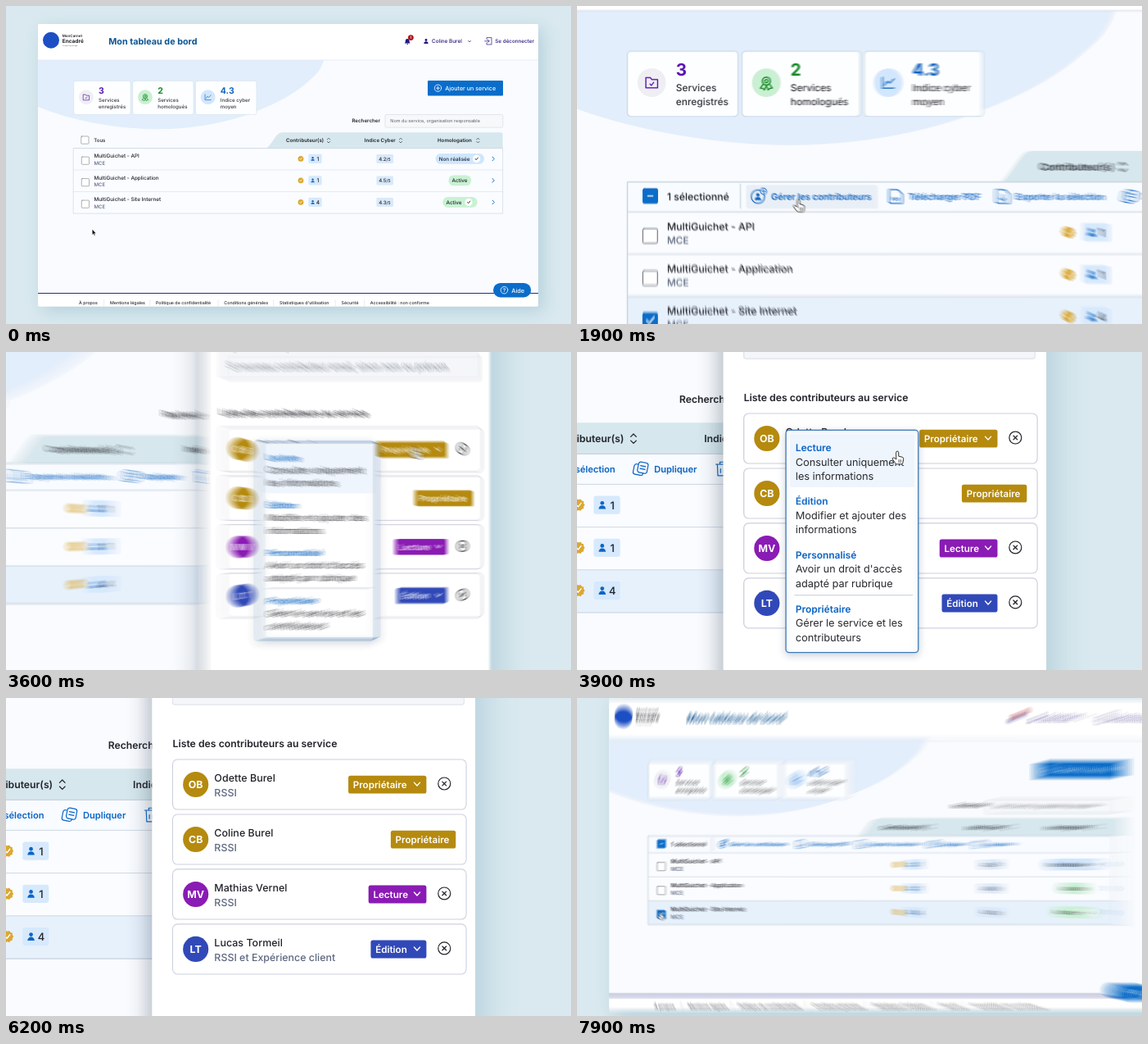
An HTML page with a canvas that plays this animation: 690 by 388 pixels, repeating every 8 s.

```html
<!DOCTYPE html>
<html lang="fr">
<head>
<meta charset="utf-8">
<title>Tableau de bord</title>
<style>
html, body { margin: 0; width: 100%; height: 100%; overflow: hidden; background: #d9e9ef; }
canvas { display: block; width: 690px; height: 388px; }
</style>
</head>
<body>
<canvas id="stage"></canvas>
<script>
const W = 690, H = 388, LOOP = 8000;
const BLUE = '#0b65c6', FILL = '#0a6dca', INK = '#22232b', NAVY = '#23187f', GREY = '#5d6880';
const GOLD = '#b58a0e', VIOLET = '#8a1bb4', INDIGO = '#3149b8', LINE = '#cfd8e2';
const dpr = window.devicePixelRatio || 1;
const stage = document.getElementById('stage');
const buffer = document.createElement('canvas');
for (const c of [stage, buffer]) { c.width = W * dpr; c.height = H * dpr; }
const out = stage.getContext('2d'), g = buffer.getContext('2d');

// Timing helpers
const clamp = v => Math.min(1, Math.max(0, v));
const ease = u => u < .5 ? 4 * u ** 3 : 1 - 4 * (1 - u) ** 3;
const ramp = (t, a, b) => ease(clamp((t - a) / (b - a)));
const track = (start, moves) => t => moves.reduce((v, [a, b, to]) => {
  const k = ramp(t, a, b);
  return v.map((p, i) => p + (to[i] - p) * k);
}, start);

const wide = [1, 0, 0];
const camera = track(wide, [
  [100, 600, [1.97, -101.8, -126]],
  [1830, 2200, wide],
  [3050, 3950, [1.97, -707.4, -217.6]],
  [6200, 6800, wide],
  [7723, 8323, [1.97, -36, -219]]
]);
const pointer = track([107, 276], [
  [80, 480, [100.1, 245.1]],
  [880, 1300, [191, 188.5]],
  [2250, 3250, [600, 166]],
  [3540, 3850, [558.4, 176]],
  [4550, 5200, [556, 242]],
  [5350, 5650, [550, 279]],
  [5680, 6030, [548, 318]],
  [6300, 6800, [642, 44]],
  [7120, 7650, [97, 262.4]]
]);
const panelShift = t => 215 * (1 - ramp(t, 1880, 2160) + ramp(t, 6850, 7080));
const menuOpen = t => t > 3500 && t < 6150;

// Drawing helpers
function text(s, x, y, size, color = INK, weight = 500, align = 'left') {
  g.font = `${weight} ${size}px Inter, "Open Sans", sans-serif`;
  g.textAlign = align;
  g.fillStyle = color;
  g.fillText(s, x, y + size * .35);
}
function paint(fill, stroke, width = .6) {
  if (fill) { g.fillStyle = fill; g.fill(); }
  if (stroke) { g.strokeStyle = stroke; g.lineWidth = width; g.stroke(); }
}
function box(x, y, w, h, r, fill, stroke, width) {
  g.beginPath();
  g.roundRect(x, y, w, h, r);
  paint(fill, stroke, width);
}
function disc(x, y, r, fill, stroke, width) {
  g.beginPath();
  g.arc(x, y, r, 0, 7);
  paint(fill, stroke, width);
}
function line(color, width, ...pts) {
  g.beginPath();
  for (let i = 0; i < pts.length; i += 2) g.lineTo(pts[i], pts[i + 1]);
  paint(null, color, width);
}
function path(d, x, y, fill, stroke, width) {
  g.save();
  g.translate(x, y);
  const p = new Path2D(d);
  if (fill) { g.fillStyle = fill; g.fill(p); }
  if (stroke) { g.strokeStyle = stroke; g.lineWidth = width; g.stroke(p); }
  g.restore();
}
function shadow(color, blur, dx, dy, scale) {
  const k = scale * dpr;
  g.shadowColor = color;
  g.shadowBlur = blur * k;
  g.shadowOffsetX = dx * k;
  g.shadowOffsetY = dy * k;
}
const noShadow = () => { g.shadowColor = 'transparent'; };
const tick = (x, y, k, color, w) => line(color, w, x - 1.6 * k, y, x - .4 * k, y + 1.3 * k, x + 1.8 * k, y - 1.4 * k);
const down = (x, y, color, k = 1) => line(color, .7, x - 1.8 * k, y - k, x, y + k, x + 1.8 * k, y - k);
const cross = (x, y, k, w) => { line(INK, w, x - k, y - k, x + k, y + k); line(INK, w, x - k, y + k, x + k, y - k); };
const person = (x, y, k, color) => {
  disc(x, y - 1.3 * k, 1.25 * k, color);
  path(`M${-2.3 * k} ${2.6 * k}a${2.3 * k} ${2.3 * k} 0 0 1 ${4.6 * k} 0z`, x, y, color);
};
function sorter(x) {
  line(INK, .6, x - 1.7, 162.9, x, 161.2, x + 1.7, 162.9);
  line(INK, .6, x - 1.7, 165.3, x, 167, x + 1.7, 165.3);
}
function checkbox(x, y, on) {
  box(x - 4.6, y - 4.6, 9.2, 9.2, .8, on ? FILL : '#fff', on ? FILL : '#62666f', .5);
}

function header(over, shift) {
  box(39, 22, 611, 44, 0, '#fff');
  line('#e2e6ef', .7, 39, 66, 650, 66);
  disc(55, 41.7, 10, '#1d4fc4');
  text('MonCarnet', 68.7, 36.6, 4.5, INK, 600);
  text('Encadré', 68.7, 43, 6.5, INK, 700);
  text('le registre partagé', 69, 48, 2.1, '#777');
  text('Mon tableau de bord', 125.3, 43.4, 10.8, '#0d5594', 700);
  path('M-3.4 2.2q1-1 1-3a2.4 2.4 0 0 1 4.8 0q0 2 1 3zM-1 2.8h2q-.2 1-1 1t-1-1z', 490.2, 43.2, NAVY);
  disc(494.4, 38.6, 3.4, '#b3161f');
  text('1', 494.4, 38.6, 4.4, '#fff', 600, 'center');
  person(513, 43, 1.15, NAVY);
  text('Coline Burel', 520, 43.2, 6.4, NAVY);
  down(566, 43.2, NAVY, .8);
  if (over && shift > 200) box(580, 36, 70, 14, 1, '#eff1f7');
  line(NAVY, .7, 587, 40.6, 587, 38.6, 593, 38.6, 593, 47, 587, 47, 587, 45);
  line(NAVY, .7, 584.6, 42.8, 590, 42.8);
  line(NAVY, .7, 588.3, 41, 590.1, 42.8, 588.3, 44.6);
  text('Se déconnecter', 597.3, 43.2, 6.3, NAVY);
}

function cards() {
  const list = [
    [82.6, 69.6, 113.1, '3', 'Services', 'enregistrés', '#5a14b4', '#efeff3'],
    [154.7, 74.4, 185.2, '2', 'Services', 'homologués', '#168a26', '#c9f0d2'],
    [231.4, 74.6, 261.8, '4.3', 'Indice cyber', 'moyen', '#0f63c0', '#d2e7fd']
  ];
  list.forEach(([x, w, tx, n, a, b, color, tint], i) => {
    box(x, 91.4, w, 41, 2.4, 'rgba(255,255,255,.92)', '#cddcea', .55);
    const cx = x + 15.3, cy = 111.2;
    disc(cx, cy, 8.9, tint);
    if (i === 0) {
      path('M-3.7 3.2v-6.4h2.8l1 1.2h3.6v5.2z', cx, cy, null, color, .7);
      tick(cx, cy + .8, .7, color, .65);
    } else if (i === 1) {
      disc(cx, cy - 1, 2.5, null, color, .8);
      disc(cx, cy - 1, 1, null, color, .7);
      path('M-2 1l-1.8 2.4 1.8.2.8 1L0 1.8l1.2 2.8.8-1 1.8-.2L2 1', cx, cy, null, color, .7);
    } else {
      line(color, .65, cx - 3.7, cy - 3.4, cx - 3.7, cy + 3.4, cx + 3.7, cy + 3.4);
      line(color, .65, cx - 2.4, cy + 1.6, cx - .8, cy - .9, cx + .9, cy + .3, cx + 3.5, cy - 2.4);
    }
    text(n, tx, 103, 10.6, color, 700);
    text(a, tx, 114.5, 6.15, '#3a3b42');
    text(b, tx, 123.3, 6.15, '#3a3b42');
  });
}

function topTools() {
  box(515, 91, 92, 18.5, 1, FILL);
  disc(527.5, 100.2, 4.2, null, '#fff', .8);
  line('#fff', .8, 525.4, 100.2, 529.6, 100.2);
  line('#fff', .8, 527.5, 98.1, 527.5, 102.3);
  text('Ajouter un service', 536.2, 100.4, 7.1, '#fff');
  text('Rechercher', 422.4, 139.8, 6.2, INK, 600);
  box(463, 132.5, 143.7, 15.7, 1.5, '#f7f8fa', '#d3d9e1');
  text('Nom du service, organisation responsable', 469.3, 140.4, 5.5, '#5b5f68', 400);
}

function toolbar(hover) {
  box(82.6, 173.6, 524, 18.8, 0, '#f8fbff');
  if (hover) box(157.5, 175.6, 82, 14.4, 1, '#e9eff6');
  checkbox(97, 182.4, true);
  line('#fff', .8, 95.4, 182.4, 98.6, 182.4);
  text('1 sélectionné', 107.5, 182.9, 6.3);
  line(LINE, .6, 153.7, 175, 153.7, 190);
  disc(164.7, 182.8, 4.2, null, BLUE, .6);
  person(164.7, 182.8, .85, BLUE);
  disc(168.2, 179.4, 1.9, '#f8fbff', BLUE, .55);
  line(BLUE, .5, 167.2, 179.4, 169.2, 179.4);
  line(BLUE, .5, 168.2, 178.4, 168.2, 180.4);
  const sheet = 'M-3.2-4.4h4.6l2.8 2.8v4.8q0 1-1 1h-6.4q-1 0-1-1v-6.6q0-1 1-1z';
  path(sheet, 251.4, 182.8, null, BLUE, .6);
  text('PDF', 251.4, 184.4, 2.7, BLUE, 700, 'center');
  path(sheet, 318.7, 182.8, null, BLUE, .6);
  path('M-.2-1.4v4m-1.5-1.5l1.5 1.5 1.5-1.5', 318.7, 182.8, null, BLUE, .6);
  g.save();
  g.translate(398.6, 182.8);
  g.rotate(.2);
  box(-4.4, -2.4, 6.2, 6.4, 1.4, null, BLUE, .6);
  box(-2, -4.2, 6, 6.6, 1.4, '#f8fbff', BLUE, .6);
  line(BLUE, .6, -.6, -1.9, 2.6, -1.9);
  line(BLUE, .6, -.6, -.1, 2.6, -.1);
  g.restore();
  path('M-3.9-2.8h7.8M-1.4-2.8v-1.4h2.8v1.4M-3-2.8l.3 7h5.4l.3-7M-1 0v2.4M1 0v2.4', 449, 182.8, null, BLUE, .6);
  const labels = [['Gérer les contributeurs', 173], ['Télécharger PDF', 259.5], ['Exporter la sélection', 326.8],
    ['Dupliquer', 406.8], ['Supprimer', 457]];
  for (const [s, x] of labels) text(s, x, 182.9, 5.65, BLUE, 600);
}

function row(i, y, t, picked, hover) {
  const names = ['API', 'Application', 'Site Internet'], mid = y + 12.8;
  const on = picked && i === 2;
  box(82.6, y, 524, 26.5, 0, on ? '#e7f1fc' : '#fafcff');
  line(LINE, .5, 82.6, y, 606.6, y);
  checkbox(96.9, y + 15.1, on);
  if (on) {
    tick(96.9, y + 15.1, 1.4, '#fff', 1);
    if (t < 1850) box(91, y + 9.2, 11.8, 11.8, 1.4, null, '#7db4ea', .8);
  }
  text('MultiGuichet - ' + names[i], 107.5, y + 9.3, 6.35, hover && !on ? BLUE : INK);
  text('MCE', 107.5, y + 17.9, 6.1, GREY);
  g.beginPath();
  for (let k = 0; k < 20; k++) {
    const a = k * Math.PI / 10, r = k % 2 ? 3.2 : 3.8;
    g.lineTo(360 + r * Math.cos(a), mid + r * Math.sin(a));
  }
  g.closePath();
  paint('#dba832');
  tick(360, mid, .85, '#fff', .7);
  box(369.4, mid - 5.6, 16.2, 11.2, 1.4, '#d6e9fd');
  person(374.6, mid, .95, BLUE);
  text('114'[i], 380.9, mid + .2, 6.6, INK, 500, 'center');
  box(452.4, mid - 5.5, 20.6, 11, 1.4, '#dae9fa');
  text(['4.2', '4.5', '4.3'][i], 455.2, mid + .3, 6.1);
  text('/5', 464.6, mid + .5, 5.2);
  const [px, pw, label, dot] = [[524.7, 59.3, 'Non réalisée', 574.6], [540.4, 27.8, 'Active', 0], [533.4, 42.2, 'Active', 565]][i];
  box(px, mid - 6.4, pw, 12.8, 6.4, i ? '#c9f1d3' : '#cfe6fd');
  text(label, px + 4.1, mid + .2, 6.3);
  if (dot) {
    disc(dot, mid, 4.6, '#fff');
    tick(dot, mid, 1, INK, .9);
  }
  line(BLUE, .9, 594, mid - 2.4, 596.3, mid, 594, mid + 2.4);
}

function table(t, x, y) {
  const picked = t > 620, top = picked ? 192.4 : 173.6;
  path('M318 173.6C321 172.5 328 161 331 157.5Q333.6 154.4 337 154.2H604q2.6 0 2.6 2.6V173.6z', 0, 0, '#d6e7ed');
  [['Contributeur(s)', 342, 394], ['Indice Cyber', 437.8, 482], ['Homologation', 527, 576.4]].forEach(([s, tx, sx]) => {
    text(s, tx, 164.1, 6.2, INK, 600);
    sorter(sx);
  });
  if (picked) toolbar(x > 157 && x < 240 && y > 175 && y < 193);
  else {
    checkbox(96.4, 163.6, false);
    text('Tous', 107.2, 164, 6.1);
  }
  for (let i = 0; i < 3; i++) {
    const ry = top + 26.5 * i, tip = y - 3;
    row(i, ry, t, picked, x < 606 && tip > ry && tip < ry + 26.5 && panelShift(t) > 200);
  }
  box(82.6, 173.6, 524, top + 79.5 - 173.6, 0, null, '#c8d2dd', .6);
}

function footer(t) {
  box(39, 351, 611, 16, 0, '#fff');
  line('#2b2a80', 1.1, 39, 350.5, 650, 350.5);
  [['À propos', 89], ['Mentions légales', 127], ['Politique de confidentialité', 183], ['Conditions générales', 266.3],
    ['Statistiques d\'utilisation', 334], ['Sécurité', 409.5], ['Accessibilité : non conforme', 444.8]].forEach(([s, x], i) => {
    text(s, x, 362.4, 5.3, '#2a2a30');
    if (i) line('#d5d8de', .5, x - 7.3, 358.5, x - 7.3, 366);
  });
  g.globalAlpha = t > 2500 ? clamp((t - 6900) / 240) : 1;
  box(595, 338, 46.2, 17.4, 8.7, FILL);
  disc(608.5, 346.7, 4.3, null, '#fff', .8);
  text('?', 608.5, 346.8, 6.4, '#fff', 600, 'center');
  text('Aide', 617.2, 347, 7.3, '#fff');
  g.globalAlpha = 1;
}

const people = [
  ['OB', 'Odette Burel', 'RSSI', GOLD, 'Propriétaire', 571.3, true],
  ['CB', 'Coline Burel', 'RSSI', GOLD, 'Propriétaire', 597.6, false],
  ['MV', 'Mathias Vernel', 'RSSI', VIOLET, 'Lecture', 583.8, true],
  ['LT', 'Lucas Tormeil', 'RSSI et Expérience client', INDIGO, 'Édition', 585.2, true]
];
function panel(scale) {
  shadow('rgba(50,70,90,.42)', 13, -1.5, 0, scale);
  box(449.6, 22, 201, 344.5, 0, '#fff');
  noShadow();
  box(449.6, 22, 201, 51.5, 0, '#dae8ee');
  box(632.8, 32.2, 11.8, 11.8, 1, '#fff');
  cross(638.7, 38.1, 1.7, .8);
  text('Gérer les contributeurs', 462.4, 41, 9.9, '#22304a', 700);
  text('Gérer la liste des personnes invitées à contribuer au service.', 462.4, 57, 6.25, '#22304a');
  text('Ajouter un ou plusieurs contributeurs', 462.4, 91.2, 6.2, INK, 600);
  box(462.4, 97.4, 180.6, 17.2, 1.5, '#f5f6fa', '#e1e5ed');
  text('Si nouveau contributeur email, sinon nom ou prénom', 467.4, 106, 6.15, '#777b86', 400);
  text('Liste des contributeurs au service', 462.4, 138.6, 6.22, INK, 600);
  people.forEach(([initials, name, role, color, label, bx, removable], i) => {
    const y = 148.5 + 34 * i, mid = y + 15.4;
    box(462.4, y, 182, 31, 3, '#fff', '#cdd0de', .55);
    disc(476.7, mid + .1, 7.9, color);
    text(initials, 476.7, mid + .4, 6.3, '#fff', 700, 'center');
    text(name, 488.2, y + 11.7, 6.35);
    text(role, 488.2, y + 20.5, 6.3, GREY);
    box(bx, y + 10, (removable ? 619.7 : 637.9) - bx, 11.1, 1.3, color);
    text(label, bx + 2.9, y + 15.7, 5.9, '#fff', 600);
    if (removable) {
      down(613.9, y + 15.3, '#fff');
      disc(630.8, y + 15, 3.8, null, INK, .6);
      cross(630.8, y + 15, 1.2, .65);
    }
  });
}

function menu(y, scale) {
  const items = [
    ['Lecture', 'Consulter uniquement', 'les informations'],
    ['Édition', 'Modifier et ajouter des', 'informations'],
    ['Personnalisé', 'Avoir un droit d\'accès', 'adapté par rubrique'],
    ['Propriétaire', 'Gérer le service et les', 'contributeurs']
  ];
  shadow('rgba(40,70,110,.22)', 5, 0, 1.5, scale);
  box(488.5, 158.8, 82.1, 137.8, 2, '#fff', '#3f7cbb', .65);
  noShadow();
  items.forEach(([title, a, b], i) => {
    const ty = 169.8 + 33.2 * i + (i === 3 ? .4 : 0);
    if (y > ty - 9 && y < ty + 24) box(491, ty - 8.6, 77.2, 33, 1, '#eef5fd');
    text(title, 494.5, ty, 6.05, BLUE, 600);
    text(a, 494.5, ty + 8.7, 6.45, '#2c2d33', 400);
    text(b, 494.5, ty + 17.5, 6.45, '#2c2d33', 400);
  });
  line(LINE, .6, 494, 261, 567, 261);
}

function cursor(t, x, y) {
  const overLink = t > 330 && !(t > 2450 && t < 3050) && !(t > 6350 && t < 6650) && !(t > 7250 && t < 7550);
  if (overLink) {
    path('M-1.6-3.2q0-.9.8-.9t.8.9v2.2l2.2.5q.9.3.8 1.2l-.4 2.4q-.1.8-1 .8h-2.6q-.6 0-1-.6l-1.7-2.4q-.4-.9.4-1t1.7.9z', x, y, '#fff', '#333', .5);
    path('M.2 1.2v1.6M1.3 1.2v1.6', x, y, null, '#333', .4);
  } else {
    path('M0 0v6.6l1.6-1.4 1 2.4 1-.4-1-2.4h2z', x - 1.7, y - 3.4, '#111', '#fff', .35);
  }
}

function scene(t) {
  const [s, tx, ty] = camera(t), [x, y] = pointer(t), shift = panelShift(t);
  g.setTransform(dpr, 0, 0, dpr, 0, 0);
  g.fillStyle = '#d9e9ef';
  g.fillRect(0, 0, W, H);
  g.transform(s, 0, 0, s, tx, ty);
  g.textRendering = 'geometricPrecision';
  g.lineCap = g.lineJoin = 'round';
  shadow('rgba(90,145,170,.27)', 20, 6, 6, s);
  box(39, 22, 611, 344.5, 2, '#f9fbfe');
  noShadow();
  g.save();
  g.beginPath();
  g.roundRect(39, 22, 611, 344.5, 2);
  g.clip();
  path('M39 66H388C386 75 380 83 371.5 90C352 108 330 119 305.5 128.4C270 143 225 150.3 183.6 150.3C135 150 80 140 39 123z', 0, 0, '#e2eefb');
  header(x > 580 && y < 52, shift);
  cards();
  topTools();
  table(t, x, y);
  footer(t);
  if (shift < 214) {
    g.save();
    g.translate(shift, 0);
    panel(s);
    g.restore();
  }
  g.restore();
  if (menuOpen(t)) menu(y - 3, s);
  cursor(t, x, y);
}

// Average several moments while the camera moves, for motion blur
function render(t) {
  const moving = Math.abs(camera(t + 15)[0] - camera(t - 15)[0]) > .001;
  const n = moving ? 14 : 1;
  for (let i = 0; i < n; i++) {
    scene(moving ? t - 15 + 30 * i / (n - 1) : t);
    out.globalAlpha = 1 / (i + 1);
    out.drawImage(buffer, 0, 0);
  }
}

const begin = performance.now();
function frame() {
  render((performance.now() - begin) % LOOP);
  requestAnimationFrame(frame);
}
frame();
</script>
</body>
</html>
```
